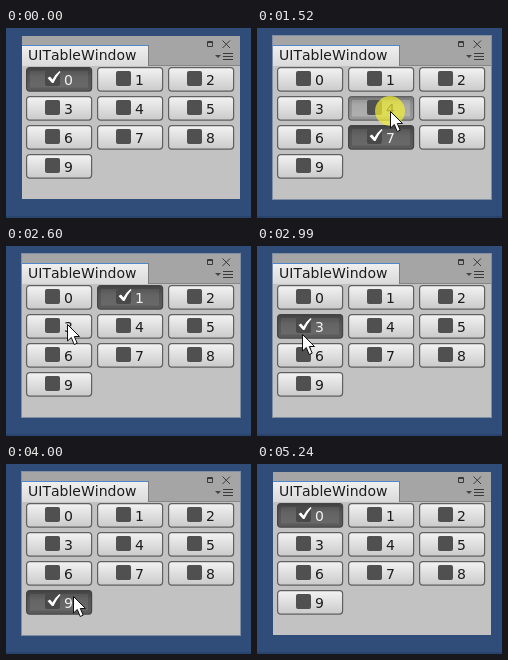
Write an HTML page that moves like this. It is 245 px wide and 190 px high and loops after 5.31 s.

```html
<!DOCTYPE html>
<html lang="en">
<head>
<meta charset="utf-8">
<title>UITableWindow</title>
<style>
  html, body { margin: 0; width: 100%; height: 100%; overflow: hidden; background: #304d79; }
  svg { display: block; width: 245px; height: 190px; }
  text { font: 14px "DejaVu Sans", sans-serif; font-kerning: none; fill: #1c1c1c; }
  .face { fill: url(#up); stroke: #606060; stroke-width: 1.2; }
  .shade { fill: none; stroke: #000; stroke-opacity: .14; stroke-width: 3; visibility: hidden; }
  .box { fill: #505050; }
  .tick { fill: #fff; visibility: hidden; }
  .down .face { fill: url(#held); }
  .down .shade, .on .shade, .on .tick { visibility: visible; }
  .on .face { fill: url(#dark); stroke: #444; }
  .on text { fill: #f0f0f0; }
  .on .box { fill: #494949; }
  .frame { fill: none; stroke: #7f8ea3; visibility: hidden; }
  .focus .frame { visibility: visible; }
</style>
</head>
<body>
<svg viewBox="0 0 245 190">
  <defs>
    <linearGradient id="tab" x2="0" y2="1">
      <stop stop-color="#f0f0f0"/><stop offset="1" stop-color="#dadada"/>
    </linearGradient>
    <linearGradient id="up" x2="0" y2="1">
      <stop stop-color="#f3f3f3"/><stop offset="1" stop-color="#cacaca"/>
    </linearGradient>
    <linearGradient id="held" x2="0" y2="1">
      <stop stop-color="#8c8c8c"/><stop offset=".35" stop-color="#a8a8a8"/><stop offset="1" stop-color="#b2b2b2"/>
    </linearGradient>
    <linearGradient id="dark" x2="0" y2="1">
      <stop stop-color="#4e4e4e"/><stop offset=".4" stop-color="#646464"/><stop offset="1" stop-color="#6b6b6b"/>
    </linearGradient>
  </defs>
  <rect width="245" height="190" fill="#304d79"/>
  <rect y="188" width="245" height="2" fill="#29446c"/>
  <g id="win">
    <rect x="16" y="8" width="218" height="163" fill="#a5a5a5"/>
    <rect x="16" y="37" width="218" height="134" fill="#c2c2c2"/>
    <path d="M142 37.5H234" stroke="#868686"/>
    <rect x="16" y="17" width="126" height="21" fill="url(#tab)"/>
    <path d="M142.500 17V38" stroke="#7c7c7c"/>
    <path d="M16 17.500H142" stroke="#4f86cc"/>
    <text x="22" y="32">UITableWindow</text>
    <g fill="none" stroke="#3a3a3a">
      <path d="M201.500 13.500H206.500V18.500H201.500ZM201 14.500H207"/>
      <path d="M216.500 12.500L224 20M224 12.500L216.500 20"/>
      <path d="M217 25.500H227M217 28.500H227M217 31.500H227"/>
    </g>
    <path d="M209 27H215L212 30Z" fill="#444"/>
    <g id="buttons"></g>
    <rect class="frame" x="15.500" y="7.500" width="219" height="164"/>
  </g>
  <g id="pointer">
    <circle id="halo" r="15" fill="#f2ee30" fill-opacity=".7"/>
    <path d="M.5 .5V17L4.300 13.500L7.200 20.500L10.200 19.200L7.300 12.500H12.500Z" fill="#fff" stroke="#111" stroke-linejoin="round"/>
  </g>
</svg>
<script>
const LOOP = 5310, STEP = 76.5;
const shown = [210, 4920], focused = [750, 5240];

// Where the pointer stops; stops with a button are clicks.
const stops = [
  { at: 210, x: 161, y: 182 },
  { at: 750, hold: 2, button: 7, x: 135, y: 112 },
  { at: 1520, hold: 2, button: 4, x: 133, y: 83 },
  { at: 2130, hold: 2, button: 1, x: 129, y: 51 },
  { at: 2910, hold: 1, button: 3, x: 44, y: 85 },
  { at: 3370, hold: 1, button: 6, x: 50, y: 104 },
  { at: 3830, hold: 2, button: 9, x: 68, y: 138 },
  { at: 4530, hold: 1, button: 0, x: 60, y: 51 },
  { at: 5070, x: 200, y: 177 }
];
for (const s of stops) s.end = s.at + Math.floor((s.hold || 0) * STEP);

const find = id => document.getElementById(id);
const win = find('win'), pointer = find('pointer'), halo = find('halo');
const ease = p => p * p * (3 - 2 * p);
const within = (t, [start, end]) => t >= start && t < end;

find('buttons').innerHTML = Array.from({ length: 10 }, (_, i) => `
  <g transform="translate(${20 + i % 3 * 71} ${39 + Math.floor(i / 3) * 29})">
    <rect class="face" x=".6" y=".6" width="65" height="23.500" rx="3"/>
    <rect class="shade" x="2.500" y="2.500" width="61" height="19.500" rx="2"/>
    <rect class="box" x="19" y="4" width="15" height="15" rx="2"/>
    <path class="tick" d="M21.500 11L24 9.500L26.500 12.500Q29 7.500 33.500 4L34.500 5Q30 10 27.500 16H26Z"/>
    <text x="38" y="18">${i}</text>
  </g>`).join('');
const buttons = [...find('buttons').children];

// Glide in equal time steps, arriving shortly before the next stop.
function pointerAt(t) {
  const i = stops.findLastIndex(s => s.at <= t);
  const from = stops[i], to = stops[i + 1];
  if (t < from.end) return [from.x, from.y];
  const count = Math.round((to.at - from.end) / STEP) - 1;
  const step = Math.floor((t - from.end) / STEP) + 1;
  const p = ease(Math.min(1, step / count));
  return ['x', 'y'].map(k => Math.round(from[k] + (to[k] - from[k]) * p));
}

function draw(t) {
  const clicks = stops.filter(s => s.hold);
  const held = clicks.find(s => within(t, [s.at, s.end]));
  const done = clicks.findLast(s => s.end <= t);
  const chosen = done ? done.button : 0;
  buttons.forEach((b, i) => {
    b.classList.toggle('on', i === chosen);
    b.classList.toggle('down', held?.button === i);
  });
  win.classList.toggle('focus', within(t, focused));
  halo.style.display = held ? '' : 'none';
  const visible = within(t, shown);
  pointer.style.display = visible ? '' : 'none';
  if (visible) pointer.setAttribute('transform', `translate(${pointerAt(t)})`);
}

const began = performance.now();
function tick() {
  draw((performance.now() - began) % LOOP);
  requestAnimationFrame(tick);
}
tick();
</script>
</body>
</html>
```
